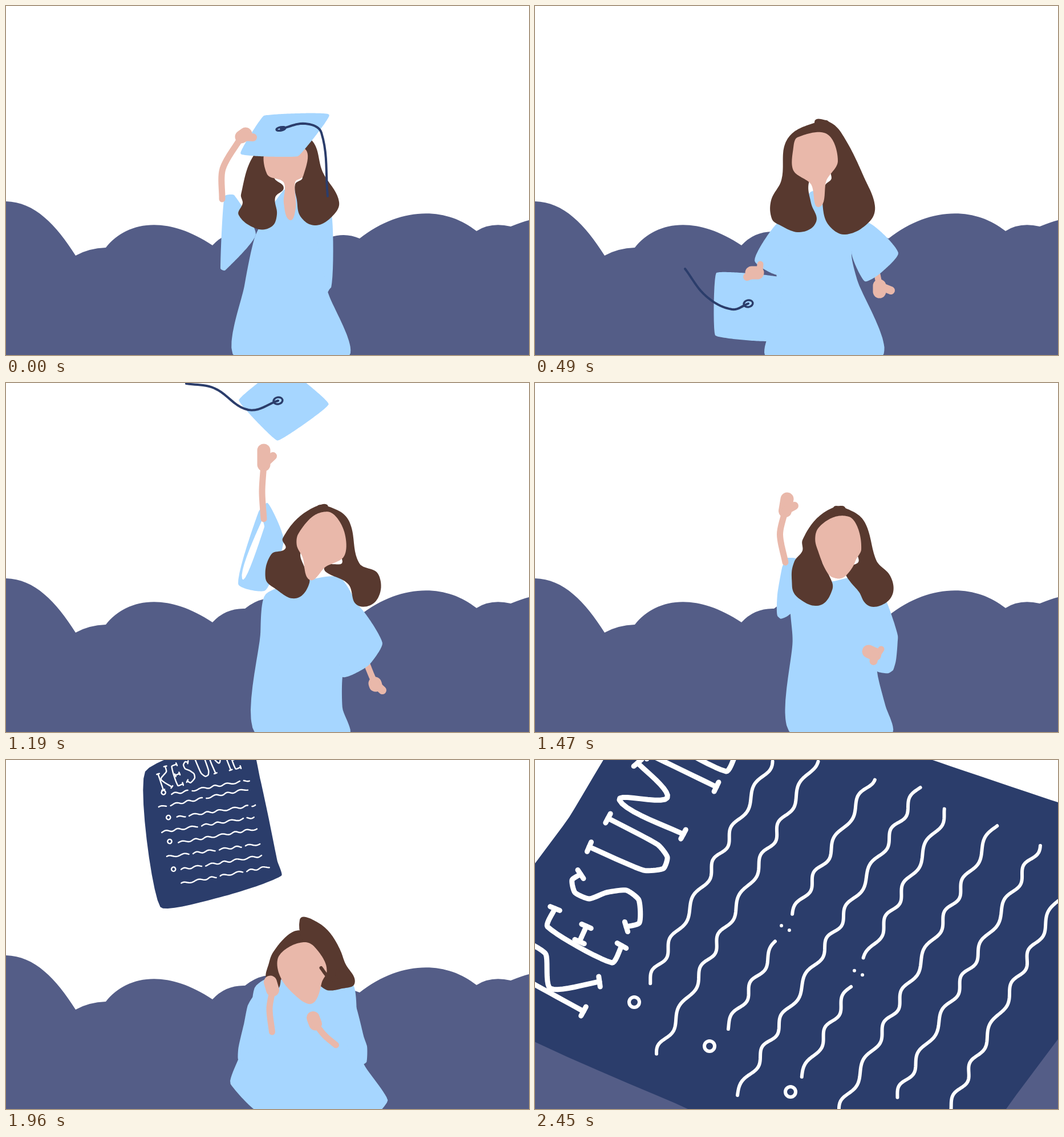
These frames come from a looping animation (917 px wide and 611 px high, 4410 ms). An HTML page with a canvas:

```html
<!DOCTYPE html>
<html lang="en">
<head>
<meta charset="utf-8">
<title>Graduation</title>
<style>
html, body { margin: 0; width: 100%; height: 100%; overflow: hidden; background: #fff; }
canvas { display: block; width: 100vw; height: 100vh; }
</style>
</head>
<body>
<canvas id="stage" width="917" height="611"></canvas>
<script>
const ctx = document.getElementById('stage').getContext('2d');
const LOOP = 4410, STEP = 70, LAST = 2450, SAMPLES = 160;
const BLUE = '#a6d6ff', SKIN = '#e9b8aa', HAIR = '#58392f', NAVY = '#2b3d6b', CLOUD = '#545d87';
const clouds = new Path2D('M0 342C50 343 88 383 122 437Q145 424 175 423C210 378 280 364 362 419Q385 394 419 395Q435 382 453 378Q520 372 568 405Q595 396 620 407C690 352 770 350 825 394Q850 378 885 386Q905 378 917 375V611H0Z');

const mix = (a, b, f) => a + (b - a) * f;

function points(text) {
  const v = text.split(' ').map(Number), p = [];
  for (let i = 0; i < v.length; i += 2) p.push([v[i], v[i + 1]]);
  return p;
}

// Spline through points; k is the roundness.
function smooth(p, closed, k) {
  const n = p.length, at = i => closed ? p[(i + n) % n] : p[Math.max(0, Math.min(n - 1, i))];
  const dir = i => {
    const a = at(i - 1), b = at(i + 1), x = b[0] - a[0], y = b[1] - a[1], d = Math.hypot(x, y) || 1;
    return [x / d, y / d];
  };
  const out = [p[0]];
  for (let i = 0; i < (closed ? n : n - 1); i++) {
    const a = at(i), b = at(i + 1), u = dir(i), w = dir(i + 1);
    const reach = Math.hypot(b[0] - a[0], b[1] - a[1]) * k;
    for (let s = 1; s <= 10; s++) {
      const f = s / 10, g = 1 - f;
      out.push([0, 1].map(c => g * g * g * a[c] + 3 * g * g * f * (a[c] + u[c] * reach) +
        3 * g * f * f * (b[c] - w[c] * reach) + f * f * f * b[c]));
    }
  }
  return out;
}

// Evenly spaced points let outlines of any shape blend.
function resample(p) {
  const len = [0], out = [];
  for (let i = 1; i < p.length; i++) len.push(len[i - 1] + Math.hypot(p[i][0] - p[i - 1][0], p[i][1] - p[i - 1][1]));
  for (let k = 0, i = 1; k <= SAMPLES; k++) {
    const d = len[len.length - 1] * k / SAMPLES;
    while (i < p.length - 1 && len[i] < d) i++;
    const f = (d - len[i - 1]) / (len[i] - len[i - 1] || 1);
    out.push([0, 1].map(c => mix(p[i - 1][c], p[i][c], f)));
  }
  return out;
}

function trace(p) {
  ctx.beginPath();
  p.forEach(q => ctx.lineTo(q[0], q[1]));
}

function stroke(p, color, width) {
  trace(p);
  ctx.strokeStyle = color;
  ctx.lineWidth = width;
  ctx.stroke();
}

function span(times, t) {
  let i = 0;
  while (i < times.length - 2 && t >= times[i + 1]) i++;
  const a = times[i], b = times[i + 1];
  return [a, b, Math.max(0, Math.min(1, (t - a) / (b - a)))];
}

// Returns t => points, blending poses keyed by time in ms.
function motion(keys, prepare = p => p) {
  const times = Object.keys(keys).map(Number), shapes = {};
  for (const k of times) shapes[k] = prepare(points(keys[k]));
  return t => {
    const [a, b, f] = span(times, t);
    return shapes[a].map((p, i) => [mix(p[0], shapes[b][i][0], f), mix(p[1], shapes[b][i][1], f)]);
  };
}

function blob(color, k, keys) {
  const pose = motion(keys, p => resample(smooth(p, true, k)));
  return t => {
    trace(pose(t));
    ctx.fillStyle = color;
    ctx.fill();
  };
}

// Points: shoulder end, elbow, wrist, fingertips, thumb.
function arm(keys) {
  const pose = motion(keys);
  return t => {
    const p = pose(t);
    stroke(smooth(p.slice(0, 3), false, .28), SKIN, 11);
    stroke([p[2], p[3]], SKIN, 23);
    stroke([p[2], p[4]], SKIN, 14);
  };
}

const gown = blob(BLUE, .2, {
  0: '487 322 509 322 568 365 570 493 564 500 600 615 402 615 418 490 438 400',
  490: '484 325 510 325 580 380 555 432 565 480 608 615 406 615 425 530 425 400',
  910: '515 335 560 332 600 385 578 428 584 480 597 615 433 615 447 415 460 330',
  1190: '530 345 585 340 615 395 590 514 590 570 602 615 438 615 446 440 455 370',
  1750: '512 350 590 335 608 420 603 490 649 615 458 615 459 455 445 345',
  2170: '480 420 612 407 621 507 645 557 690 615 336 615 385 540 411 512 437 425'
});
const leftSleeve = blob(BLUE, .16, {
  0: '400 331 438 400 384 463 376 460 383 333',
  280: '415 340 440 430 375 430 378 365',
  490: '425 380 450 390 433 471 385 446',
  910: '450 327 447 415 376 445 366 405 367 332',
  1190: '487 275 455 363 407 352 443 225 459 210',
  1750: '442 345 459 455 437 503 423 465 426 368',
  2170: '430 480 440 500 385 555 411 515'
});
const opening = blob('#fff', .16, {
  1050: '420 330 420 330',
  1190: '449 240 453 252 414 343',
  1330: '430 330 430 330'
});
const rightSleeve = blob(BLUE, .16, {
  0: '545 345 571 365 570 493 550 450',
  490: '580 378 637 432 603 470 578 482 555 432',
  910: '600 377 662 438 597 491 580 428',
  1190: '612 385 660 455 635 495 589 514 585 420',
  1750: '598 340 614 440 637 500 628 507 603 488',
  2170: '610 480 644 540 620 560 590 530'
});
const leftHair = blob(HAIR, .36, {
  0: '470 300 487 318 472 335 475 365 466 386 440 390 408 366 415 345 412 330 434 262 470 240',
  490: '480 310 484 345 493 378 465 396 428 383 415 372 414 340 432 305 443 232 500 201 515 204',
  910: '505 300 518 330 522 365 502 390 460 383 450 352 472 295 502 222 530 207 555 206',
  1190: '517 295 524 325 532 350 508 377 472 360 455 342 465 300 490 290 485 272 525 226 565 218',
  1750: '490 315 508 350 511 372 490 402 452 393 446 360 443 335 456 270 490 226 525 224',
  2170: '478 440 460 449 443 433 440 415 475 352 520 334 555 346 530 405 495 412'
});
const rightHair = blob(HAIR, .36, {
  0: '500 230 536 235 555 290 584 343 568 372 540 384 516 368 510 340 507 312 520 300',
  490: '490 203 520 205 545 235 577 300 596 350 586 378 545 400 516 385 505 355 508 315 520 300',
  910: '530 207 560 207 590 225 602 320 613 345 618 370 600 376 580 338 541 325 570 310',
  1190: '545 219 580 222 603 245 619 315 653 335 650 380 616 389 600 352 560 330 560 319 590 312',
  1750: '500 223 540 231 562 258 582 320 600 365 575 390 548 394 535 378 528 360 530 330 547 310',
  2170: '530 336 570 348 597 370 607 390 623 415 600 410 570 415 527 405'
});
const face = blob(SKIN, .3, {
  0: '458 250 524 250 521 298 507 308 508 352 498 375 487 345 487 309 458 295',
  490: '460 230 512 224 531 272 511 305 498 352 484 312 453 288 453 248',
  910: '505 235 540 222 580 232 582 290 573 312 541 322 523 365 517 318 497 285',
  1190: '512 265 540 232 570 227 593 260 593 303 560 322 533 345 520 305 510 285',
  1750: '478 248 512 234 544 248 548 308 530 322 515 362 498 325 475 290',
  2170: '478 440 515 400 540 403 575 425 572 475 528 505 485 470'
});
const strand = motion({
  1750: '575 325 575 325 575 325 575 325',
  2170: '530 403 553 432 577 444 588 412'
});
const cap = blob(BLUE, .06, {
  0: '452 192 567 190 512 263 411 259',
  140: '440 120 545 125 475 205 380 190',
  280: '235 205 338 215 335 310 230 310',
  490: '318 467 436 477 414 586 316 577',
  910: '206 268 325 274 319 388 209 379',
  1120: '465 10 555 70 480 140 400 70',
  1190: '485 -30 566 37 476 101 408 30',
  1330: '480 -210 560 -150 480 -90 410 -150'
});
const tasselPose = motion({
  0: '482 215 525 206 553 222 564 333',
  140: '460 148 500 150 530 190 545 240',
  280: '284 255 250 255 205 290 158 330',
  490: '374 521 345 531 300 508 263 460',
  910: '260 320 253 335 300 402 328 477',
  1120: '470 78 435 98 380 75 322 70',
  1190: '477 31 425 47 365 9 316 1',
  1330: '475 -150 440 -130 390 -145 320 -180'
});
const leftArm = arm({
  0: '379 338 380 285 413 229 420 224 433 230',
  140: '385 345 378 260 372 190 366 178 385 175',
  280: '388 375 350 330 328 292 322 282 338 285',
  490: '395 452 394 460 390 467 380 467 372 474',
  910: '367 336 345 335 322 334 305 333 322 356',
  1190: '452 238 449 190 452 143 452 118 468 128',
  1750: '426 390 410 340 425 305 432 288 442 302',
  2170: '507 562 514 530 510 500 495 490 480 482'
});
const rightArm = arm({
  0: '545 400 545 430 545 450 548 460 542 462',
  490: '600 470 602 480 604 490 604 500 624 498',
  910: '620 470 622 480 625 488 621 497 640 494',
  1050: '650 465 660 475 668 484 688 498 664 500',
  1190: '632 490 640 510 647 526 648 529 660 538',
  1750: '582 442 565 434 545 424 522 411 527 436',
  2170: '575 556 552 530 540 500 555 492 566 489'
});

function tassel(t) {
  const p = tasselPose(t), [x, y] = p[0];
  ctx.beginPath();
  ctx.ellipse(x, y, 8, mix(3, 6, Math.min(1, t / 490)), -.2, 0, 7);
  ctx.strokeStyle = NAVY;
  ctx.lineWidth = 3.5;
  ctx.stroke();
  stroke(smooth(p, false, .36), NAVY, 4);
}

// Each row: start, end, then places of its gaps in percent.
const front = {
  x: 248, y: 216, turn: 0, size: 1, wave: 4, period: 58, gap: 16,
  edge: '161 -124 609 17 540 200 470 352 385 530 363 590 250 563 110 512 -139 383',
  rows: ['194 22 501 178 24 90', '115 35 472 205 11 51', '152 117 456 279 13 93', '61 128 421 318 41 90',
    '91 208 400 365', '14 227 372 426 26 54 82', '31 307 346 471 28', '-5 357 344 528 42 72'],
  rings: ['122 95', '64 181', '5 287', '170 -4']
};
const close = {
  x: 485, y: 302, turn: -87, size: 1.5, wave: 6, period: 74, gap: 54, dots: true,
  edge: '-134 409 60 100 243 -163 697 0 917 74 1147 143 826 611 684 819 268 611',
  rows: ['200 390 415 0', '214 515 492 0', '337 470 592 30 40', '355 587 675 46',
    '468 555 722 87 39', '535 611 808 113', '634 590 884 148', '727 611 917 245'],
  rings: ['174 424', '306 501', '448 581']
};
const E = ['35 260 22 292 135 355 152 325', '78 318 90 291'];
const RESUM = [
  '85 440 -10 388', '-10 320 19 340 27 400 113 388', ...E,
  '80 200 65 210 70 232 95 243 125 232 160 228 182 245 183 285 160 292',
  '95 152 190 193 225 190 232 170 215 148 128 102',
  '260 130 148 70 232 66 180 5', '200 -10 318 47'
];
// Sheet centre, turn in degrees, size
const flight = { 1750: [462, 2, -74, .164], 2170: [248, 216, 0, 1], 2450: [485, 302, -87, 1.5] };

function drawRow(text, sheet, pen) {
  const [x, y, x2, y2, ...gaps] = text.split(' ').map(Number);
  const d = Math.hypot(x2 - x, y2 - y), ux = (x2 - x) / d, uy = (y2 - y) / d;
  const at = (s, w) => [x + ux * s + uy * w, y + uy * s - ux * w];
  const stops = gaps.map(g => g * d / 100);
  let from = 0;
  for (const stop of [...stops, d + sheet.gap / 2]) {
    const p = [];
    for (let s = from; s <= stop - sheet.gap / 2; s += 3) {
      const a = s / sheet.period * 2 * Math.PI;
      p.push(at(s, sheet.wave * Math.sin(a + .5 * Math.sin(a / 3 + x))));
    }
    stroke(p, '#fff', pen);
    from = stop + sheet.gap / 2;
  }
  if (sheet.dots) for (const s of stops) for (const side of [-8, 8]) stroke([at(s, side), at(s, side)], '#fff', pen);
}

// Every stroke end carries a short cross bar.
function drawLetter(text) {
  const p = points(text);
  stroke(smooth(p, false, .18), '#fff', 9);
  for (const [a, b] of [[p[0], p[1]], [p[p.length - 1], p[p.length - 2]]]) {
    const d = Math.hypot(b[0] - a[0], b[1] - a[1]) / 9, x = (b[1] - a[1]) / d, y = (a[0] - b[0]) / d;
    stroke([[a[0] - x, a[1] - y], [a[0] + x, a[1] + y]], '#fff', 9);
  }
}

function drawSheet(t) {
  const [a, b, f] = span(Object.keys(flight).map(Number), t), from = flight[a], to = flight[b];
  const sheet = t < 2310 ? front : close;
  const zoom = from[3] * (to[3] / from[3]) ** f / sheet.size, pen = Math.max(6, 1.6 / zoom);
  ctx.save();
  ctx.translate(mix(from[0], to[0], f), mix(from[1], to[1], f));
  ctx.rotate((mix(from[2], to[2], f) - sheet.turn) * Math.PI / 180);
  ctx.scale(zoom, zoom);
  ctx.translate(-sheet.x, -sheet.y);
  trace(smooth(points(sheet.edge), true, .12));
  ctx.fillStyle = NAVY;
  ctx.fill();
  sheet.rows.forEach(row => drawRow(row, sheet, pen));
  for (const [[x, y]] of sheet.rings.map(points)) {
    ctx.beginPath();
    ctx.arc(x, y, 9, 0, 7);
    ctx.stroke();
  }
  if (sheet === front) {
    ctx.translate(462, 95);
    ctx.rotate(80 * Math.PI / 180);
    ctx.scale(2 / 3, 2 / 3);
    ctx.translate(-320, -46);
  }
  RESUM.forEach(drawLetter);
  ctx.translate(200, -335);
  E.forEach(drawLetter);
  ctx.restore();
}

function frame() {
  const t = Math.min(LAST, Math.floor(performance.now() % LOOP / STEP) * STEP);
  ctx.fillStyle = '#fff';
  ctx.fillRect(0, 0, 917, 611);
  ctx.fillStyle = CLOUD;
  ctx.fill(clouds);
  ctx.lineCap = ctx.lineJoin = 'round';
  if (t < 1330) rightArm(t);
  for (const part of [gown, leftSleeve, opening, rightSleeve, leftHair, rightHair, face]) part(t);
  if (t > 1750) stroke(smooth(strand(t), false, .36), HAIR, 6);
  cap(t);
  tassel(t);
  leftArm(t);
  if (t >= 1330) rightArm(t);
  if (t >= 1750) drawSheet(t);
  requestAnimationFrame(frame);
}
requestAnimationFrame(frame);
</script>
</body>
</html>
```
